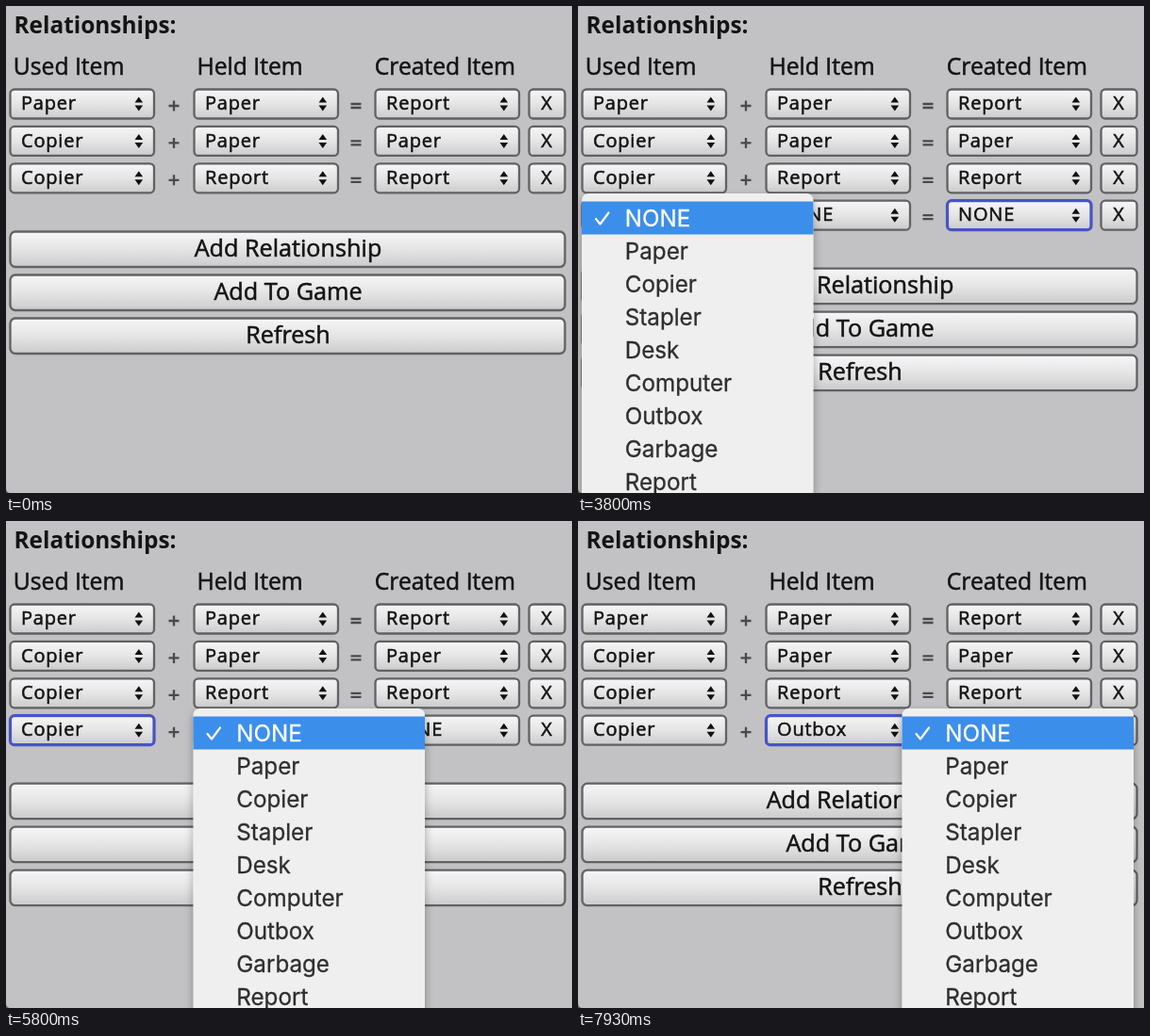
Write an HTML page that moves like this. It is 600x517 px and loops after 8 s.

```html
<!DOCTYPE html>
<html lang="en">
<head>
<meta charset="utf-8">
<title>Relationships panel</title>
<style>
  html, body { margin: 0; width: 100%; height: 100%; overflow: hidden; background: #c2c1c3; }
  svg { display: block; width: 100%; height: 100%; }
  text { font: 25.2px "Open Sans", "Noto Sans", sans-serif; fill: #141414; stroke: #141414; stroke-width: .55px; }
  .title { font-size: 24.4px; font-weight: 700; stroke: none; }
  .head { font-size: 24.7px; }
  .field text { font-size: 20px; letter-spacing: .8px; }
  .field .close { letter-spacing: 0; text-anchor: middle; }
  .mid { text-anchor: middle; }
  .box { fill: url(#raised); stroke: #626264; stroke-width: 2.3; }
  .focus .box { stroke: #4853c4; stroke-width: 3.2; }
  .pressed .box { fill: url(#sunken); }
  .sign { stroke: #4a4a4c; stroke-width: 2.3; fill: none; }
  .menu text { font: 24.2px Inter, Roboto, sans-serif; fill: #2e2e2e; stroke: #2e2e2e; stroke-width: .3px; }
  .menu .on text { fill: #fff; stroke: #fff; }
  .menu .bar { fill: none; }
  .menu .on .bar { fill: #3c8eeb; }
  .tick { fill: none; stroke: #2e2e2e; stroke-width: 2.2; stroke-linecap: round; stroke-linejoin: round; }
  .on .tick { stroke: #fff; }
</style>
</head>
<body>
<svg id="stage" viewBox="0 0 600 517" preserveAspectRatio="none">
  <defs>
    <linearGradient id="raised" x2="0" y2="1">
      <stop offset="0" stop-color="#f6f6f6"/>
      <stop offset=".5" stop-color="#e5e5e6"/>
      <stop offset="1" stop-color="#cbcbcc"/>
    </linearGradient>
    <linearGradient id="sunken" x2="0" y2="1">
      <stop offset="0" stop-color="#8f8e90"/>
      <stop offset=".35" stop-color="#a1a0a2"/>
      <stop offset="1" stop-color="#a8a7a9"/>
    </linearGradient>
    <filter id="shadow" x="-20%" y="-10%" width="140%" height="120%">
      <feDropShadow dx="0" dy="4" stdDeviation="5" flood-opacity=".32"/>
    </filter>
  </defs>
  <rect width="600" height="517" fill="#c2c1c3"/>
  <path d="M0 512Q0 517 5 517H0Z" fill="#555"/>
  <text class="title" x="8.5" y="29">Relationships:</text>
  <text class="head" x="7.8" y="73">Used Item</text>
  <text class="head" x="202.5" y="73">Held Item</text>
  <text class="head" x="390.8" y="73">Created Item</text>
</svg>
<script>
  const LOOP = 8000, FRAME = 1000 / 15;
  const COLUMNS = [4.5, 199.5, 391.5];
  const ITEMS = ["NONE", "Paper", "Copier", "Stapler", "Desk", "Computer", "Outbox", "Garbage", "Report"];
  const ADD = { press: 1930, done: 2070 };
  const FOCUS = [[3000, 2], [5270, 0], [7470, 1]];
  // hover: [time, item index]; -1 is the blink after a choice
  const MENUS = [
    { x: 4, open: 3270, fade: 5035, hover: [[3270, 0], [4330, 1], [4600, 2], [4870, -1], [4930, 2]] },
    { x: 198.5, open: 5600, fade: 7235,
      hover: [[5600, 0], [5930, 1], [6070, 2], [6270, 3], [6400, 4], [6530, 5], [6660, 6], [7060, -1], [7130, 6]] },
    { x: 343.5, open: 7800, fade: Infinity, hover: [[7800, 0]] }
  ];
  const FADE = 180;
  const stage = document.getElementById("stage");

  function add(parent, tag, attrs = {}, text = "") {
    const node = document.createElementNS("http://www.w3.org/2000/svg", tag);
    for (const key in attrs) node.setAttribute(key, attrs[key]);
    node.textContent = text;
    return parent.appendChild(node);
  }

  const box = (parent, x, y, width, height, rx) =>
    add(parent, "rect", { class: "box", x, y, width, height, rx });

  function dropdown(parent, x, y, value) {
    const g = add(parent, "g", { class: "field" });
    box(g, x, y, 152.5, 31, 4.5);
    const label = add(g, "text", { x: x + 11.5, y: y + 21.6 }, value);
    add(g, "path", { d: `M${x + 132} ${y + 14}l4.3 -6 4.3 6zm0 3l4.3 6 4.3 -6z`, fill: "#111" });
    return { g, label };
  }

  function row(index, values) {
    const g = add(stage, "g"), y = 88.5 + index * 39.4;
    const fields = values.map((value, i) => dropdown(g, COLUMNS[i], y, value));
    add(g, "path", { class: "sign", d: `M172.5 ${y + 17.5}h11m-5.5 -5.5v11` });
    add(g, "path", { class: "sign", d: `M365.5 ${y + 15.5}h11m-11 4h11` });
    const close = add(g, "g", { class: "field" });
    box(close, 554.5, y, 38, 31, 4.5);
    add(close, "text", { class: "close", x: 573, y: y + 21.6 }, "X");
    return { g, fields };
  }

  function button(y, text) {
    const g = add(buttons, "g");
    box(g, 4.5, y, 588, 37.5, 5.5);
    add(g, "text", { class: "mid", x: 299, y: y + 26.5 }, text);
    return g;
  }

  function menu({ x }) {
    const g = add(stage, "g", { class: "menu" });
    add(g, "rect", { x, y: 199, width: 245.5, height: 400, rx: 7, fill: "#f0eff0", filter: "url(#shadow)" });
    const items = ITEMS.map((name, i) => {
      const item = add(g, "g"), y = 207.5 + i * 35;
      add(item, "rect", { class: "bar", x, y, width: 245.5, height: 35 });
      add(item, "text", { x: x + 45.8, y: y + 26.5 }, name);
      if (!i) add(item, "path", { class: "tick", d: `M${x + 15} ${y + 18.5}l4.5 5.5 9 -12` });
      return item;
    });
    return { g, items };
  }

  row(0, ["Paper", "Paper", "Report"]);
  row(1, ["Copier", "Paper", "Paper"]);
  row(2, ["Copier", "Report", "Report"]);
  const newRow = row(3, ["NONE", "NONE", "NONE"]);
  const buttons = add(stage, "g");
  const addButton = button(239.5, "Add Relationship");
  button(285.5, "Add To Game");
  button(331.5, "Refresh");
  const menus = MENUS.map(menu);

  const latest = (steps, t) => steps.reduce((found, [start, value]) => t >= start ? value : found, -1);

  function draw(t) {
    const added = t >= ADD.done;
    newRow.g.style.display = added ? "" : "none";
    buttons.setAttribute("transform", `translate(0 ${added ? 39.2 : 0})`);
    addButton.classList.toggle("pressed", t >= ADD.press && !added);

    const focused = latest(FOCUS, t);
    newRow.fields.forEach(({ g }, i) => g.classList.toggle("focus", i === focused));
    newRow.fields[0].label.textContent = t >= FOCUS[1][0] ? "Copier" : "NONE";
    newRow.fields[1].label.textContent = t >= FOCUS[2][0] ? "Outbox" : "NONE";

    MENUS.forEach(({ open, fade, hover }, i) => {
      const alpha = t < open ? 0 : Math.max(0, Math.min(1, 1 - (t - fade) / FADE));
      menus[i].g.style.display = alpha ? "" : "none";
      menus[i].g.style.opacity = alpha;
      const active = latest(hover, t);
      menus[i].items.forEach((item, k) => item.classList.toggle("on", k === active));
    });
  }

  function tick() {
    const t = performance.now() % LOOP;
    draw(Math.floor((t + 4) / FRAME) * FRAME);
    requestAnimationFrame(tick);
  }
  tick();
</script>
</body>
</html>
```
